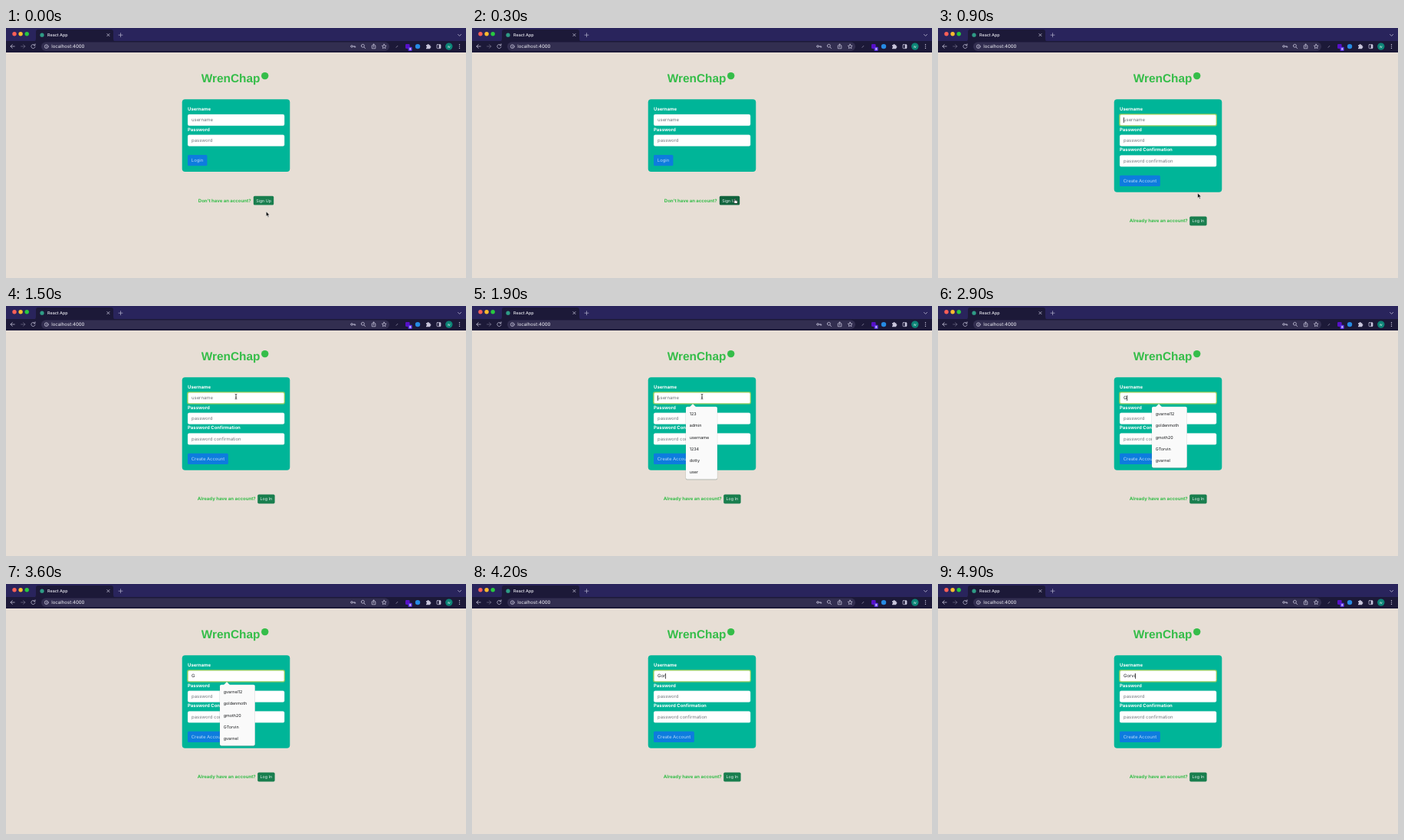
An HTML page that plays this animation: 600x327 px, repeating every 5000 ms.

```html
<!DOCTYPE html>
<html lang="en">
<head>
<meta charset="utf-8">
<title>Sign up</title>
<style>
html, body { margin: 0; width: 100%; height: 100%; overflow: hidden; background: #e7ded5; }
svg { display: block; width: 600px; height: 327px; }
text { font-family: Inter, Roboto, sans-serif; white-space: pre; text-rendering: geometricPrecision; }
.ui { fill: none; stroke: #c9c6dc; stroke-width: .75; stroke-linecap: round; stroke-linejoin: round; }
</style>
</head>
<body>
<svg id="stage" viewBox="0 0 600 327"></svg>
<script>
const LOOP = 5000, STEP = 100;
const SWITCH = 700, OPEN = 1600, TYPE = 2700;
const GREEN = '#35bd49', TEAL = '#00b598', BAR = '#1c1938', ICON = '#c9c6dc';

const typed = [[TYPE, 'G'], [3900, 'Go'], [4200, 'Gor'], [4500, 'Gorv'], [4800, 'Gorvi']];
const path = [[0, 339.3, 240], [100, 340, 236], [200, 342, 226], [300, 343, 223.5],
  [700, 343, 223.5], [900, 338.7, 216], [1100, 322, 168], [1300, 304, 126], [1500, 300, 118.5], [5000, 300, 118.5]];
const allNames = ['123', 'admin', 'username', '1234', 'dotty', 'user'];
const gNames = ['gvarnel12', 'goldenmoth', 'gmoth20', 'GTorvin', 'gvarnel'];

const stage = document.getElementById('stage');
function el(parent, tag, attrs, text) {
  const node = document.createElementNS('http://www.w3.org/2000/svg', tag);
  for (const k in attrs) node.setAttribute(k, attrs[k]);
  if (text !== undefined) node.textContent = text;
  parent.appendChild(node);
  return node;
}
const group = (parent = stage) => el(parent, 'g', {});
const rect = (p, x, y, width, height, fill, rx = 0, more = {}) =>
  el(p, 'rect', { x, y, width, height, fill, rx, ...more });
const disc = (p, cx, cy, r, fill) => el(p, 'circle', { cx, cy, r, fill });
const line = (p, d, more = {}) => el(p, 'path', { d, class: 'ui', ...more });
const label = (p, x, y, text, size, fill, weight = 400) =>
  el(p, 'text', { x, y, 'font-size': size, fill, 'font-weight': weight }, text);
const show = (node, on) => node.setAttribute('visibility', on ? 'visible' : 'hidden');

function drawBrowser() {
  const g = group();
  rect(g, 0, 0, 600, 18, '#29245c');
  rect(g, 0, 17, 600, 15, BAR);
  el(g, 'path', { d: 'M36 17.5Q39 17.5 39 14V5Q39 2 42 2H137Q140 2 140 5V14Q140 17.5 143 17.5Z', fill: BAR });
  rect(g, 46, 18.5, 454, 11.5, '#322e50', 5.7);
  ['#fe5f57', '#febc2e', '#28c840'].forEach((c, i) => disc(g, 11 + i * 8.1, 7.7, 2.7, c));
  disc(g, 47, 9.2, 2.6, '#2f9c86');
  label(g, 54, 11.2, 'React App', 5.4, '#eeeef5', 500);
  line(g, 'M131.8 7.5l3.2 3.2m0-3.2l-3.2 3.2M589.6 8.4l2 2l2-2');
  line(g, 'M147 9.2h5m-2.5-2.5v5', { opacity: .8 });
  line(g, 'M11.2 24H6m2.3-2.4L6 24l2.3 2.4');
  line(g, 'M19.6 24h5.2m-2.3-2.4l2.3 2.4l-2.3 2.4', { opacity: .45 });
  line(g, 'M37.6 22.5A2.6 2.6 0 1 0 38 24.7M38 20.8v2h-2');
  el(g, 'circle', { cx: 52.7, cy: 24.2, r: 2.4, class: 'ui' });
  line(g, 'M52.7 24v1.3m0-2.5v.1');
  label(g, 59.2, 26.3, 'localhost:4000', 6.1, '#f2f1f8');
  line(g, 'M452.3 24h3.4v1.3m-1.4-1.3v1.1M449.7 24a1.3 1.3 0 1 0 2.6 0a1.3 1.3 0 1 0-2.6 0');
  line(g, 'M463.4 23.3a2 2 0 1 0 4 0a2 2 0 1 0-4 0M466.9 24.9l1.8 1.9');
  line(g, 'M478.2 23h-.9v3.8h4.6V23h-.9M479.6 25v-4m-1.4 1.3l1.4-1.4l1.4 1.4');
  line(g, 'M493.2 21.2l.9 1.9l2 .2l-1.5 1.4l.4 2l-1.8-1l-1.8 1l.4-2l-1.5-1.4l2-.2Z');
  line(g, 'M509 25.4l1.8-2', { opacity: .7 });
  rect(g, 521, 21, 5.6, 6, '#5710c9', 1.2);
  rect(g, 524.5, 24.7, 5.2, 5.2, '#552ce0', 1);
  label(g, 525.9, 29, '8', 4.2, '#fff', 600);
  disc(g, 537, 24.1, 3.2, '#268be4');
  el(g, 'path', { d: 'M548 22.2h1.5a1.1 1.1 0 0 1 2.2 0h1.6v1.5a1.1 1.1 0 0 1 0 2.2v1.3H548v-1.4a1 1 0 0 0 0-2Z', fill: ICON });
  rect(g, 562, 21.7, 5, 5, 'none', .7, { class: 'ui' });
  rect(g, 564.7, 21.7, 2.3, 5, ICON);
  disc(g, 577.8, 24.1, 4.7, '#0d8577');
  label(g, 575.8, 25.8, 'w', 4.8, '#e2f3ef');
  [21.8, 24.1, 26.4].forEach(y => disc(g, 591.5, y, .7, ICON));
}

function field(p, y, hint, focus) {
  if (focus) rect(p, 236, y - 1, 128, 16.6, '#a5d65c', 2.8, { opacity: .75 });
  rect(p, 237.1, y, 126, 14.7, '#fff', 1.9,
    { stroke: focus ? '#8bc653' : '#dfe6e6', 'stroke-width': focus ? .8 : .3 });
  return label(p, 242, y + 9.4, hint, 5.95, '#72787e');
}
const panel = height => [229.7, 93.2, 140.6, height, TEAL, 4];
const title = (p, y, text) => label(p, 237, y, text, 6, '#fff', 700);
function button(p, x, y, w, h, text, size, fill, pad, ink = '#e9f3f3') {
  const box = rect(p, x, y, w, h, fill, 1.6);
  label(p, x + pad, y + h / 2 + size * .36, text, size, ink);
  return box;
}
const submit = (p, y, w, text) => button(p, 237, y, w, 14.3, text, 5.9, '#0d7cde', 4.8, '#b4d8f6');

function drawLogin() {
  const g = group();
  rect(g, ...panel(94.8));
  title(g, 107.5, 'Username');
  field(g, 113, 'username');
  title(g, 134.5, 'Password');
  field(g, 139.8, 'password');
  submit(g, 166, 25.4, 'Login');
  label(g, 250.8, 227.6, 'Don\'t have an account?', 6, GREEN, 700);
  const sign = button(g, 322.8, 219.8, 26.4, 11.8, 'Sign Up', 5.3, '#197e4e', 3.4);
  return { g, sign };
}

function drawSignup() {
  const g = group();
  rect(g, ...panel(121.6));
  title(g, 107.5, 'Username');
  const hint = field(g, 113, 'username', true);
  const value = label(g, 242, 122.4, '', 5.95, '#23272b');
  const caret = rect(g, 241.9, 116.9, .75, 7, '#111');
  title(g, 134.5, 'Password');
  field(g, 139.8, 'password');
  title(g, 161.3, 'Password Confirmation');
  field(g, 166.6, 'password confirmation');
  submit(g, 192.8, 52.8, 'Create Account');
  label(g, 249.8, 254.2, 'Already have an account?', 6, GREEN, 700);
  button(g, 328.2, 246.6, 22.4, 11.8, 'Log In', 5.3, '#197e4e', 3.4);
  return { g, hint, value, caret };
}

function drawMenu(names, w, h) {
  const g = group();
  rect(g, 278.7, 132.4, w, h, '#6f8580', 2, { opacity: .45 });
  el(g, 'path', { d: 'M283.8 132.2l4.2-4.2l4.2 4.2Z', fill: '#fafafa' });
  rect(g, 279, 131.8, w - .6, h - .4, '#fafafa', 1.8);
  names.forEach((name, i) => label(g, 283.8, 143.2 + i * 15.25, name, 5.4, '#16181a'));
  return g;
}

function drawPointers() {
  const arrow = group(), hand = group(), beam = group();
  el(arrow, 'path', { d: 'M0 0V6.4L1.5 5L2.5 7.4L3.6 6.9L2.6 4.7H4.6Z', fill: '#080808', stroke: '#fff', 'stroke-width': .5 });
  el(hand, 'path', { d: 'M-.7 0Q.1-.8.6 0V2.2L3 2.8Q3.5 3 3.4 4L2.9 6H-.2L-2.2 3.5Q-1.9 2.5-.7 3.5Z', fill: '#fff', stroke: '#0a0a0a', 'stroke-width': .6 });
  el(beam, 'path', { d: 'M-1.3-3.2Q0-3.2 0-2.3Q0-3.2 1.3-3.2M0-2.3V2.3M-1.3 3.2Q0 3.2 0 2.3Q0 3.2 1.3 3.2M-.7 .9H.7', fill: 'none', stroke: '#222', 'stroke-width': .8 });
  return { arrow, hand, beam };
}

rect(stage, 0, 0, 600, 327, '#e7ded5');
drawBrowser();
label(stage, 254.8, 70.5, 'WrenChap', 15.4, GREEN, 700)
  .setAttribute('style', 'font-family: "Liberation Sans", Arial, sans-serif');
disc(stage, 337.7, 62.6, 4.7, GREEN);
const login = drawLogin(), signup = drawSignup();
const menus = [drawMenu(allNames, 41.5, 95.2), drawMenu(gNames, 46.3, 80)];
const pointers = drawPointers();

function place(t) {
  const i = path.findIndex((p, k) => k && t <= p[0]);
  const [t0, x0, y0] = path[i - 1], [t1, x1, y1] = path[i];
  const k = (t - t0) / (t1 - t0);
  return [x0 + (x1 - x0) * k, y0 + (y1 - y0) * k];
}

function render(now) {
  const t = Math.floor((now % LOOP) / STEP) * STEP;
  const joined = t >= SWITCH;
  const entry = typed.filter(e => e[0] <= t).pop();
  const text = entry ? entry[1] : '';
  const [x, y] = place(t);

  show(login.g, !joined);
  show(signup.g, joined);
  const onButton = !joined && y < 231;
  login.sign.setAttribute('fill', onButton ? '#11633d' : '#197e4e');

  // "inherit" would be needed only for children of a visible group
  signup.hint.setAttribute('opacity', text ? 0 : 1);
  signup.value.textContent = text;
  const since = entry ? entry[0] : t >= OPEN ? OPEN : SWITCH;
  show(signup.caret, joined && Math.floor((t - since) / 500) % 2 === 0);
  const width = text ? signup.value.getComputedTextLength() : 0;
  signup.caret.setAttribute('x', 241.9 + width);

  show(menus[0], t >= OPEN && !text);
  show(menus[1], text.length === 1);

  const kind = text ? '' : onButton ? 'hand' : joined && y < 128 ? 'beam' : 'arrow';
  for (const k in pointers) {
    show(pointers[k], k === kind);
    pointers[k].setAttribute('transform', `translate(${x} ${y})`);
  }
}

const start = performance.now();
function tick() {
  render(performance.now() - start);
  requestAnimationFrame(tick);
}
tick();
</script>
</body>
</html>
```
